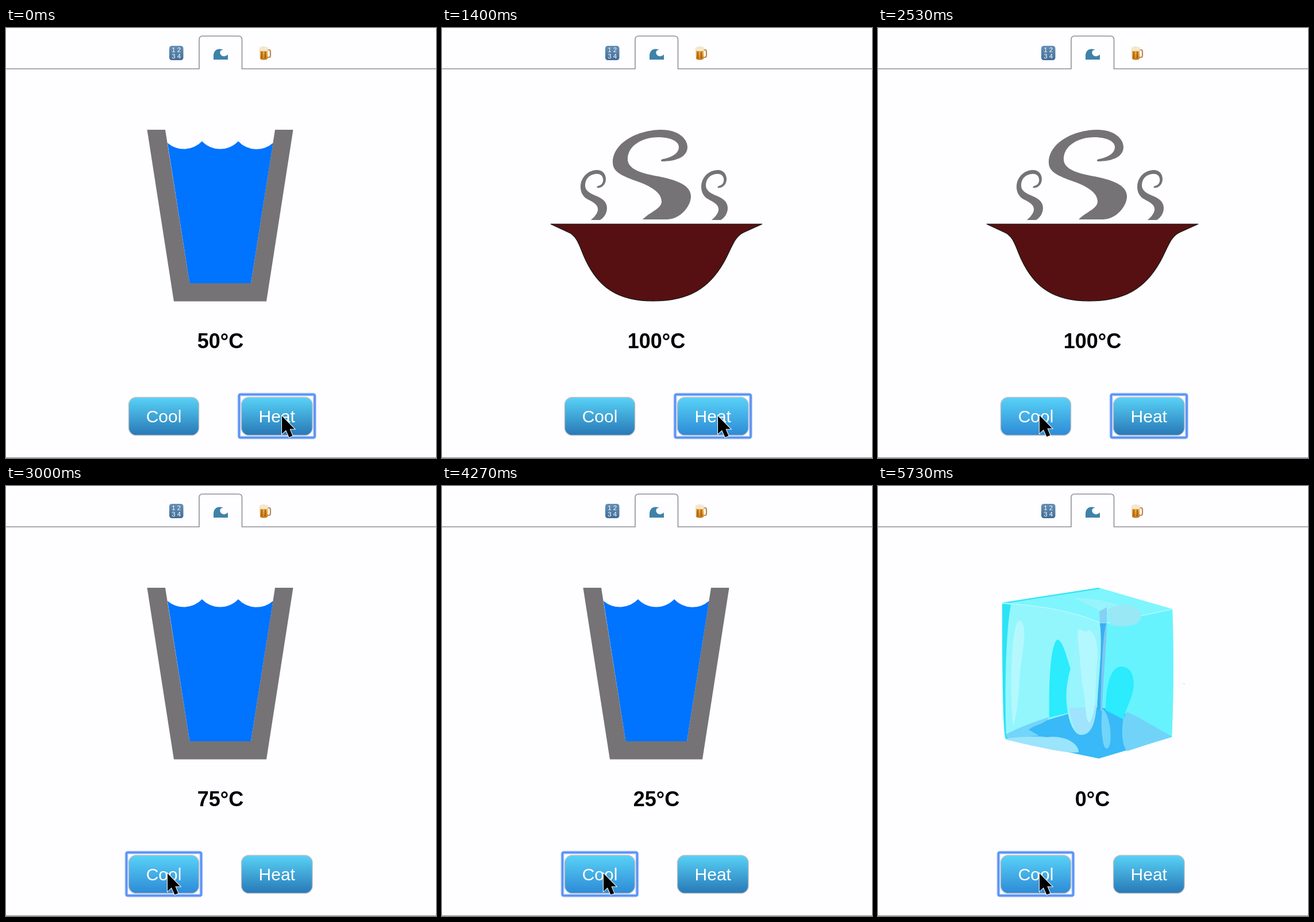
These frames come from a looping animation (748x748 px, 5.79 s). An HTML page:

```html
<!DOCTYPE html>
<html lang="en">
<head>
<meta charset="utf-8">
<title>Water temperature</title>
<style>
  html, body { margin: 0; width: 100%; height: 100%; overflow: hidden; background: #fefdff; }
  svg { display: block; width: 100vw; height: 100vh; }
  text { font-family: "Liberation Sans", Arial, sans-serif; text-anchor: middle; }
  .temp { font-size: 36px; font-weight: bold; }
  .label { font-size: 30px; fill: #fff; }
  .focus rect { fill: none; stroke: #5b93f4; }
</style>
</head>
<body>
<svg viewBox="0 0 748 748">
  <defs>
    <linearGradient id="idle" x2="0" y2="1">
      <stop stop-color="#58d2f7"/><stop offset="1" stop-color="#2878b6"/>
    </linearGradient>
    <linearGradient id="hover" x2="0" y2="1">
      <stop stop-color="#58d2f7"/><stop offset="1" stop-color="#2d8ad6"/>
    </linearGradient>
    <linearGradient id="key" x2="0" y2="1">
      <stop stop-color="#6690b5"/><stop offset="1" stop-color="#416d98"/>
    </linearGradient>
    <linearGradient id="beer" x2="0" y2="1">
      <stop stop-color="#f4b840"/><stop offset="1" stop-color="#c97a1c"/>
    </linearGradient>
    <path id="wisp" d="M259 334C266 328 272 321 271 314C270 305 258 301 250 296C243 290 241 283 241 276C241 260 254 247 270 247C279 247 285 254 285 263C285 272 278 279 270 278C268 276 271 275 274 274C279 272 281 267 280 262C279 256 274 253 267 254C256 255 249 263 249 274C249 283 258 288 268 292C281 297 287 304 287 313C287 321 283 329 275 334Z"/>
  </defs>

  <!-- tabs -->
  <path d="M0 71H336V20Q336 14 342 14H404Q410.500 14 410.500 20V71H748" fill="none" stroke="#919095" stroke-width="1.600"/>
  <path d="M0 747.500H748" stroke="#858387"/>
  <rect x="284" y="31" width="24.500" height="25" rx="4.500" fill="url(#key)"/>
  <g fill="#fff" font-size="11.500">
    <text x="291.500" y="42">1</text><text x="301" y="42">2</text>
    <text x="291.500" y="53">3</text><text x="301" y="53">4</text>
  </g>
  <path d="M361 55V47C362 38 369 34 378 38C372 38 371 43 374 47C377 50 382 50 386 46V55Z" fill="#3f82a8"/>
  <g>
    <rect x="453" y="38" width="7" height="13" rx="3" fill="none" stroke="#b98a55" stroke-width="2.200"/>
    <path d="M441.500 36H455V54Q448 57 442 54Z" fill="url(#beer)"/>
    <path d="M445 41V53M451 41V53" stroke="#8d4f12" stroke-width="1.500"/>
    <path d="M441 38Q439 33 444 33Q448 30 452 33Q457 32 456 38L454 40H443Z" fill="#f3e7d2"/>
  </g>

  <g id="glass">
    <path d="M245.500 177H277L319.500 444H426L468 177H499.500L453 475.500H292Z" fill="#757376"/>
    <path d="M281 200A43.500 43.500 0 0 0 341 197A43.500 43.500 0 0 0 404 197A43.500 43.500 0 0 0 464.500 200L426 444H319.500Z" fill="#0073ff"/>
  </g>

  <g id="bowl">
    <g fill="#757376">
      <path d="M349 333C362 320 382 314 382 302C382 285 360 274 340 267C312 257 297 250 297 234C297 200 340 177 382 177C410 177 427 192 427 207C427 224 408 232 382 232C380 230 381 229 384 228C400 225 412 218 412 207C412 196 395 190 376 190C348 190 323 205 323 228C323 245 345 252 370 257C410 264 433 274 433 293C433 310 415 332 392 333Z"/>
      <use href="#wisp"/><use href="#wisp" x="210"/>
    </g>
    <path d="M189 341H557L526 355C507 363 503 386 490 408C465 452 430 475 367 475C305 475 272 450 250 404C240 384 237 362 219 355Z" fill="#561012" stroke="#101a14" stroke-width="1.200"/>
  </g>

  <g id="ice">
    <path d="M216 203L384 177L512 214C515 290 514 380 511 437L384 474L224 441C218 430 216 300 216 203Z" fill="#93f6fd"/>
    <path d="M388 239L512 214C515 290 514 380 511 437L384 474Z" fill="#67f3fd"/>
    <path d="M216 203L231 207C220 270 221 390 223 433L227 442L222 440C216 420 216 270 216 203Z" fill="#2ce3f6"/>
    <path d="M216 203L384 177L512 214L391 240C340 217 280 207 216 205Z" fill="#7ff5fd"/>
    <path d="M216 203L384 177L386 179L230 203Z" fill="#35e6f4"/>
    <path d="M216 204C280 207 340 217 391 240L512 214" fill="none" stroke="#b5f9fe" stroke-width="1.500"/>
    <path d="M340 195C375 194 410 203 430 210C415 222 425 229 406 231C385 214 361 204 340 195Z" fill="#98f4fc"/>
    <path d="M398 224C396 207 428 204 444 209C461 214 462 231 450 239C435 247 405 244 402 239Q408 230 398 224Z" fill="#98e8f6"/>
    <path d="M223 432C250 418 325 399 365 386C410 380 470 413 511 436L384 474L226 441Z" fill="#39b9f7"/>
    <path d="M223 432C245 420 275 409 298 402C290 415 275 414 262 424L280 434L226 440Z" fill="#73d5fa"/>
    <path d="M224 439C245 437 275 434 294 437C320 433 349 445 349 463C330 467 260 450 226 442Z" fill="#9ae4fc"/>
    <path d="M312 267C300 276 297 340 298 403L334 394C326 365 329 335 335 318C328 298 322 269 312 267Z" fill="#2bebfd"/>
    <path d="M423 314C440 314 445 330 445 347C443 370 430 388 427 406L396 390C396 350 404 314 423 314Z" fill="#2bebfd"/>
    <path d="M427 404C422 430 426 456 434 461L511 436C485 421 458 404 433 393Z" fill="#72d3f9"/>
    <path d="M348 250C360 246 377 258 385 247C387 300 381 340 380 384C377 420 368 433 352 433C333 429 324 380 329 345L335 318Z" fill="#98f4fd"/>
    <path d="M333 386C350 386 365 385 380 382C377 420 368 433 352 433C342 430 336 408 333 386Z" fill="#9fe3fd"/>
    <path d="M348 250C354 247 360 258 366 251C377 253 382 270 382 300C376 340 383 388 368 412C359 405 363 380 356 350C352 318 350 280 347 264Z" fill="#b3f8fe"/>
    <path d="M246 234C258 236 255 270 250 300C244 340 245 395 235 416C230 380 229 240 246 234Z" fill="#b4f8fe"/>
    <path d="M385 218L398 211V240H386Z" fill="#83d2f4"/>
    <path d="M386 239H398C397 290 391 340 390 392L383 388C383 335 391 285 386 239Z" fill="#7bc7f3"/>
    <path d="M386 239H397C390 265 389 320 387 390L381 389C383 335 392 280 386 239Z" fill="#39aff1"/>
    <path d="M390 388C398 390 407 420 404 445C402 460 395 460 392 448C388 428 388 405 390 388Z" fill="#73d4fa"/>
    <path d="M530 343L534 345" stroke="#9af2f8"/>
  </g>

  <text class="temp" id="temp" x="373" y="557"></text>

  <g id="buttons"></g>

  <path id="cursor" d="M0 0V31L7 24.500L12.500 37L18.500 34.500L13.500 22.500H22Z" stroke="#fff" stroke-width="2" paint-order="stroke"/>
</svg>
<script>
const LOOP = 5790;
const $ = id => document.getElementById(id);

// [start ms, degrees]
const temps = [[0, 50], [670, 75], [1335, 100], [2800, 75], [3400, 50], [4000, 25], [4600, 0]];
// [ms, x, y] of the pointer tip
const path = [[0, 480, 675], [1900, 480, 675], [2060, 455, 686], [2230, 370, 690], [2400, 292, 681], [2500, 281, 674]];
const HOVER_START = 200, FOCUS_SWITCH = 2740;

function addButton(name, x, width) {
  const mid = x + width / 2;
  $("buttons").insertAdjacentHTML("beforeend", `
    <g class="focus" id="focus${name}">
      <rect x="${x - 3.5}" y="637.5" width="${width + 7}" height="75" rx="3" stroke-width="6" opacity=".4"/>
      <rect x="${x - 3.5}" y="637.5" width="${width + 7}" height="75" rx="2" stroke-width="3.5"/>
    </g>
    <rect id="face${name}" x="${x + .5}" y="642.5" width="${width - 1}" height="66" rx="13" stroke="#bdbec4" stroke-width="1.4"/>
    <text class="label" x="${mid}" y="685.5">${name}</text>`);
}
addButton("Cool", 213, 123);
addButton("Heat", 409, 124.5);

function pointerAt(t) {
  const i = path.findIndex(p => p[0] > t);
  if (i < 0) return path[path.length - 1].slice(1);
  const [a, b] = [path[i - 1], path[i]];
  const k = (t - a[0]) / (b[0] - a[0]);
  return [a[1] + (b[1] - a[1]) * k, a[2] + (b[2] - a[2]) * k];
}

const show = (id, on) => $(id).setAttribute("visibility", on ? "visible" : "hidden");
const paint = (name, hot) => $("face" + name).setAttribute("fill", hot ? "url(#hover)" : "url(#idle)");

function draw() {
  const t = performance.now() % LOOP;
  const degrees = temps.filter(s => s[0] <= t).pop()[1];
  const [x, y] = pointerAt(t);

  $("temp").textContent = degrees + "°C";
  show("ice", degrees <= 0);
  show("glass", degrees > 0 && degrees < 100);
  show("bowl", degrees >= 100);

  show("focusHeat", t < FOCUS_SWITCH);
  show("focusCool", t >= FOCUS_SWITCH);
  paint("Heat", t >= HOVER_START && x > 409);
  paint("Cool", x < 336);
  $("cursor").setAttribute("transform", `translate(${x} ${y})`);
  requestAnimationFrame(draw);
}
draw();
</script>
</body>
</html>
```
